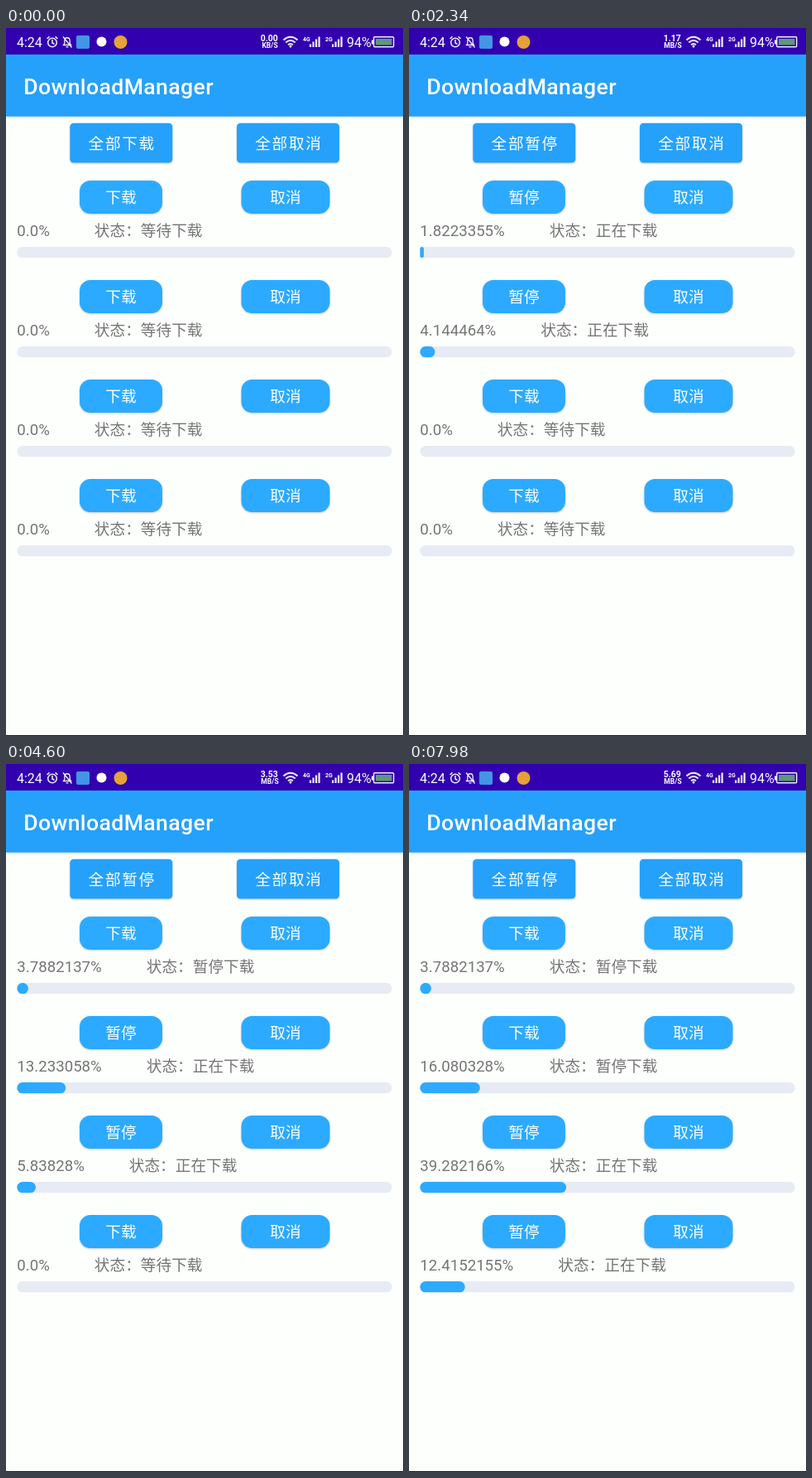
An HTML page for the animation above (8000 ms loop, 480 px wide and 854 px high).

```html
<!DOCTYPE html>
<html lang="zh-CN">
<head>
<meta charset="utf-8">
<title>DownloadManager</title>
<style>
  html, body { margin: 0; width: 100%; height: 100%; overflow: hidden; background: #fdfffd; }
  svg { display: block; width: 100%; height: 100%; }
  text { font-family: Roboto, "Noto Sans CJK SC", "Noto Sans CJK", sans-serif; font-size: 18.667px; white-space: pre; }
  .title { font-size: 26.667px; font-weight: 500; letter-spacing: .0125em; }
  .big { letter-spacing: .0893em; }
  .clock { font-size: 16px; }
  .speed { font-size: 10.5px; font-weight: 700; text-anchor: middle; }
  .unit { font-size: 8.5px; font-weight: 700; text-anchor: middle; }
  .net { font-size: 7px; font-weight: 700; }
  .mid { text-anchor: middle; }
  .button { filter: drop-shadow(0 1.5px 1.2px rgba(0, 0, 0, .2)); }
  .bar { filter: drop-shadow(0 1.5px 1.5px rgba(0, 0, 0, .18)); }
  .line { fill: none; stroke: #f2effa; stroke-width: 1.5; }
</style>
</head>
<body>
<svg id="stage" viewBox="0 0 480 854"></svg>
<script>
const LOOP = 8000, STEP = 36, TRACK = 453.33;
const LOAD = '下载', PAUSE = '暂停';

// Each download: when it becomes active, when it is paused, and [time, percent] points.
const downloads = [
  { start: 1000, pause: 3330, points: [[1150, 0], [1470, 0.47475746], [2340, 1.8223355], [3330, 3.7882137]] },
  { start: 1000, pause: 5420, points: [[1180, 0], [1470, 1.0054867], [2340, 4.144464], [3630, 10.112396], [5420, 16.080328]] },
  { start: 3400, pause: Infinity, points: [[3600, 0], [3630, 0.06110952], [5790, 13.393042], [6790, 24.820412], [7980, 39.282166]] },
  { start: 5500, pause: Infinity, points: [[5760, 0], [5790, 0.07408949], [6790, 5.6768093], [7980, 12.4152155]] }
];
const speeds = ['0.00', '1.17', '3.53', '4.46', '3.79', '5.69'];

const rect = (x, y, w, h, fill, r = 0, extra = '') =>
  `<rect x="${x}" y="${y}" width="${w}" height="${h}" rx="${r}" fill="${fill}" ${extra}/>`;
const text = (x, y, content, cls = '', fill = '#fff', id = '') =>
  `<text x="${x}" y="${y}" class="${cls}" fill="${fill}" id="${id}">${content}</text>`;
const path = (d, extra = '') => `<path class="line" d="${d}" ${extra}/>`;

function signal(x, label) {
  const bars = [0, 1, 2, 3].map(i => rect(x + 8 + i * 3.5, 19.5 - i * 3, 2.2, 3.5 + i * 3, '#f2effa'));
  return text(x, 15.5, label, 'net') + bars.join('');
}

function statusBar() {
  return rect(0, 0, 480, 32, '#3200ae')
    + text(13, 23, '4:24', 'clock')
    + '<circle class="line" cx="56" cy="17.5" r="5.3"/>'
    + path('M56 14v4l2.5 1.5M49.5 13l3-2.6M62.5 13l-3-2.6')
    + path('M69.5 20.5h9l-1.3-2v-3c0-5-6.4-5-6.4 0v3zM72.5 22.8h3M69 10.5l10.5 13', 'style="stroke-width:1.3"')
    + rect(85, 9, 16, 16, '#4296e4', 2)
    + '<circle cx="115.5" cy="16.5" r="6" fill="#fff"/>'
    + '<circle cx="138.5" cy="17" r="8" fill="#e6a237"/>'
    + text(318.3, 16, '', 'speed', '#fff', 'speed')
    + text(319, 24, '', 'unit', '#fff', 'unit')
    + path('M335.5 14.5q8.5-7.5 17 0M338.3 17.5q5.7-5 11.4 0M341 20.3q3-2.6 6 0', 'style="stroke-width:2"')
    + '<circle cx="344" cy="22" r="1.5" fill="#fff"/>'
    + signal(359, '4G') + signal(386, '2G')
    + text(412, 23, '94%', 'clock')
    + rect(442, 14.5, 2, 5, '#f2effa')
    + rect(444.7, 10.7, 24, 12, 'none', 1, 'stroke="#f2effa" stroke-width="1.4"')
    + rect(447, 13, 19.5, 7.5, '#5c9a79');
}

function bigButton(x, label, id) {
  return rect(x, 114.8, 124, 47.7, '#25a1fb', 4.5, 'class="button"')
    + text(x + 22.3, 146, label, 'big', '#fff', id);
}

function row(i) {
  const y = 184 + i * 120;
  return rect(89, y, 100, 40, '#2caaff', 13, 'class="button"')
    + text(139, y + 27, '', 'mid', '#fff', 'action' + i)
    + rect(284.5, y, 107, 40, '#2caaff', 13, 'class="button"')
    + text(338, y + 27, '取消', 'mid')
    + text(13.3, y + 66.8, `<tspan id="percent${i}"></tspan><tspan id="state${i}" dx="54"></tspan>`, '', '#757575')
    + rect(13.33, y + 80, TRACK, 13.33, '#e7ebf3', 6.67)
    + rect(13.33, y + 80, 0, 13.33, '#2caaff', 0, `id="fill${i}"`);
}

document.getElementById('stage').innerHTML =
  rect(0, 0, 480, 854, '#fdfffd')
  + rect(0, 32, 480, 74.67, '#25a1fb', 0, 'class="bar"')
  + statusBar()
  + text(21.3, 79.8, 'DownloadManager', 'title')
  + bigButton(77.3, '', 'all') + bigButton(279, '全部取消', 'cancelAll')
  + downloads.map((_, i) => row(i)).join('')
  + rect(0, 853, 480, 1, '#101010');

const el = id => document.getElementById(id);
const setText = (id, value) => { if (el(id).textContent !== value) el(id).textContent = value; };

// Progress advances in small steps, as the download reports arrive.
function percentAt(points, t) {
  if (t < points[0][0]) return 0;
  const next = points.findIndex(p => p[0] > t);
  if (next < 0) return points[points.length - 1][1];
  const [t0, p0] = points[next - 1], [t1, p1] = points[next];
  const held = Math.floor((t - t0) / STEP) * STEP;
  return p0 + (p1 - p0) * held / (t1 - t0);
}

// Shortest decimal that identifies the single-precision value.
function floatText(v) {
  if (!v) return '0.0';
  let digits = 6;
  while (digits < 9 && Math.fround(+v.toPrecision(digits)) !== Math.fround(v)) digits++;
  return String(+v.toPrecision(digits));
}

function draw(t) {
  setText('all', '全部' + (t < downloads[0].start ? LOAD : PAUSE));
  const tick = Math.max(0, Math.floor((t - 300) / 1500));
  setText('speed', speeds[tick]);
  setText('unit', tick ? 'MB/S' : 'KB/S');
  downloads.forEach(({ start, pause, points }, i) => {
    const active = t >= start && t < pause;
    const percent = percentAt(points, t);
    const width = Math.floor(percent) / 100 * TRACK;
    const radius = Math.min(6.67, width / 2);
    setText('action' + i, active ? PAUSE : LOAD);
    setText('percent' + i, floatText(percent) + '%');
    setText('state' + i, '状态：' + (active ? '正在' : t < start ? '等待' : '暂停') + LOAD);
    const fill = el('fill' + i);
    fill.setAttribute('width', width);
    fill.setAttribute('rx', radius);
    fill.setAttribute('ry', radius);
  });
}

const origin = performance.now();
function frame() {
  draw((performance.now() - origin) % LOOP);
  requestAnimationFrame(frame);
}
frame();
</script>
</body>
</html>
```
